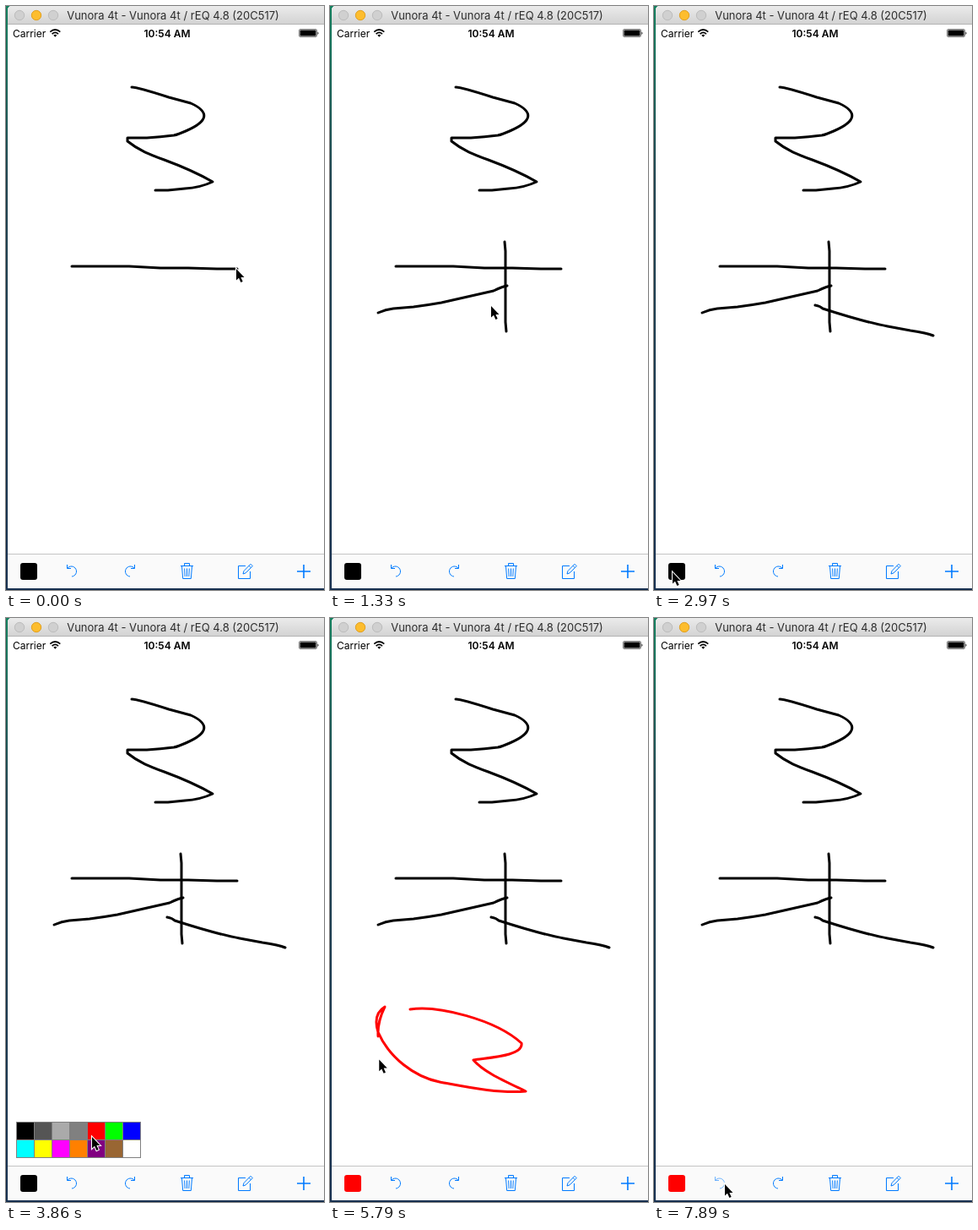
Animation of 377x691 px, one loop 8000 ms. Source, as an HTML page:

```html
<!DOCTYPE html>
<html lang="en">
<head>
<meta charset="utf-8">
<title>Sketch pad</title>
<style>
  html, body { margin: 0; width: 100%; height: 100%; overflow: hidden; background: #fff; }
  svg { display: block; width: 377px; height: 691px; }
  text { font-family: Inter, Roboto, sans-serif; font-size: 12px; }
  .ink { fill: none; stroke-width: 3; stroke-linecap: round; stroke-linejoin: round; }
  .icon { fill: none; stroke: #007aff; }
</style>
</head>
<body>
<svg viewBox="0 0 377 691">
  <defs>
    <linearGradient id="desk" x2="0" y2="1">
      <stop offset="0" stop-color="#15805f"/>
      <stop offset=".3" stop-color="#1f4350"/>
      <stop offset="1" stop-color="#173050"/>
    </linearGradient>
    <linearGradient id="bar" x2="0" y2="1">
      <stop offset="0" stop-color="#ebebeb"/>
      <stop offset="1" stop-color="#d2d2d2"/>
    </linearGradient>
  </defs>

  <!-- window -->
  <rect width="377" height="691" fill="url(#desk)"/>
  <path d="M2 689V5Q2 0 7 0H377V689Z" fill="#fff"/>
  <path d="M2 22V5Q2 0 7 0H377V22Z" fill="url(#bar)"/>
  <path d="M2 21.5H377" stroke="#b4b4b4"/>
  <g fill="#d0d0d0" stroke="#bcbcbc">
    <circle cx="16" cy="11" r="5.7"/>
    <circle cx="36" cy="11" r="5.7" fill="#fdbd2e" stroke="#e0a022"/>
    <circle cx="56" cy="11" r="5.7"/>
  </g>
  <text x="198" y="16" text-anchor="middle" fill="#2c2c2c" style="font-size:13px">Vunora 4t - Vunora 4t / rEQ 4.8 (20C517)</text>

  <!-- status bar -->
  <text x="8" y="37">Carrier</text>
  <text x="191" y="37" text-anchor="middle" font-weight="600">10:54 AM</text>
  <g fill="none" stroke="#000" stroke-width="1.7">
    <path d="M52.3 30.7Q58.3 25.3 64.3 30.7M54.6 33.1Q58.3 29.7 62 33.1"/>
    <path d="M56.3 34.6Q58.3 32.8 60.3 34.6L58.3 36.8Z" fill="#000" stroke="none"/>
  </g>
  <rect x="347.5" y="27.5" width="21" height="9" rx="1.5" fill="none" stroke="#000" stroke-opacity=".5"/>
  <rect x="348.5" y="28.5" width="19" height="7" rx=".5"/>
  <path d="M369.5 30.5Q371.5 32 369.5 34Z"/>

  <g id="sheet"></g>

  <!-- toolbar -->
  <rect x="2" y="648" width="375" height="41" fill="#fafafa"/>
  <path d="M2 648.5H377" stroke="#c4c4c4"/>
  <rect id="swatch" x="17" y="659" width="20" height="20" rx="3"/>
  <g class="icon">
    <g id="undo"><path id="turn" d="M72.5 661V665.5H77M72.8 665.3A6 6 0 1 1 78 675"/></g>
    <use href="#turn" transform="matrix(-1 0 0 1 225 0)"/>
    <path d="M207 662.5H222M211.5 662V659.5H217.5V662M208.5 663L209.7 677.5H219.3L220.5 663M211.7 665.5L212.2 675M214.5 665.5V675M217.3 665.5L216.8 675"/>
    <path d="M284 662.5H275.5V677.5H289.5V669M281 672L282 668.5 290 660.3 292.3 662.6 284.3 670.8ZM288 662.3L290.3 664.6"/>
    <path d="M345 669H361M353 661V677" stroke-width="1.6"/>
  </g>

  <g id="palette"><rect x="12" y="596" width="148" height="43" fill="#808080"/></g>
  <path id="cursor" d="M0 1V14.6L3 11.8 5.4 17.1 7.7 16.1 5.4 11H9.5Z" stroke="#fff" stroke-width="2" paint-order="stroke"/>
</svg>

<script>
const LOOP = 8000, STEP = 148.15, LAST = 53;
const OPEN_AT = 22, RED_AT = 28, PRESS_AT = 51, UNDO_AT = 52;
const INK_LAG = 26; // px the ink trails behind the moving pen
const $ = id => document.getElementById(id);

function add(parent, tag, attrs) {
  const el = document.createElementNS('http://www.w3.org/2000/svg', tag);
  for (const key in attrs) el.setAttribute(key, attrs[key]);
  return parent.appendChild(el);
}

const show = (el, on) => el.setAttribute('visibility', on ? 'visible' : 'hidden');

'#000 #555 #aaa #808080 red lime blue cyan yellow magenta #ff8000 purple #996633 #fff'
  .split(' ').forEach((fill, i) => add($('palette'), 'rect', {
    x: 13 + i % 7 * 21, y: 597 + Math.floor(i / 7) * 21, width: 20, height: 20, fill
  }));

// One pointer gesture between two steps; without a colour it only hovers.
function gesture(from, to, d, color) {
  const el = add($('sheet'), 'path', { d, class: 'ink', stroke: color || 'none' });
  return { from, to, color, el, length: el.getTotalLength() };
}

const gestures = [
  gesture(-9, -5, 'M149 96Q156 96 193 108L219 115C241 125 241 136 213 148Q204 152 199 153Q183 155 167 156H144V160C170 181 196 180 245 208Q230 215 212 216L192 218H177', '#000'),
  gesture(-4, 0, 'M78 308H146L183 310H216L250 311H274', '#000'),
  gesture(0, 2, 'M273 310L207 279'),
  gesture(2, 3.8, 'M207 279L208 290V374L209 385', '#000'),
  gesture(3.8, 5, 'M209 385L210 331'),
  gesture(5, 7, 'M210 331Q204 332 194 337L132 351Q115 354 99 356L75 358Q66 359 57 363', '#000'),
  gesture(7, 9, 'M57 363L191 354'),
  gesture(9, 11.5, 'M191 354Q197 355 200 358Q250 374 277 379L304 384Q324 387 331 390', '#000'),
  gesture(13, 20, 'M331 390L64 613L22 669'),
  gesture(22, 26, 'M22 669L102 613'),
  gesture(28, 30, 'M102 613L95 463'),
  gesture(30.5, 38.6, 'M95 463C128 458 196 475 227 503C230 518 189 520 170 523C182 537 205 547 232 560C198 563 158 554 130 549C100 543 70 520 57 490C53 477 55 466 65 460Q56 478 57 495', 'red'),
  gesture(38.6, 42, 'M57 495L61 580'),
  gesture(42, 50, 'M61 580Q205 640 84 669')
];

// Pen strokes run evenly, hovering slows down towards its goal.
function travelled(g, n) {
  const t = Math.max(0, Math.min(1, (n - g.from) / (g.to - g.from)));
  return g.length * (g.color ? t : 1 - (1 - t) ** 3);
}

function draw(now) {
  // the screen refreshes in even steps, not continuously
  const n = Math.min(LAST, Math.floor((now % LOOP + 10) / STEP));
  for (const g of gestures) {
    const ink = n >= g.to ? g.length : travelled(g, n) - INK_LAG;
    show(g.el, ink > 0 && !(g.color === 'red' && n >= UNDO_AT));
    g.el.setAttribute('stroke-dasharray', `${Math.max(0, ink)} 999`);
  }
  const current = gestures.filter(g => g.from <= n).pop();
  const { x, y } = current.el.getPointAtLength(travelled(current, n));
  $('cursor').setAttribute('transform', `translate(${x} ${y})`);
  $('swatch').setAttribute('fill', n < RED_AT ? '#000' : 'red');
  show($('palette'), n >= OPEN_AT && n < RED_AT);
  $('undo').setAttribute('opacity', n < PRESS_AT ? 1 : 0.55);
}

const start = performance.now();
function tick() {
  draw(performance.now() - start);
  requestAnimationFrame(tick);
}
tick();
</script>
</body>
</html>
```
